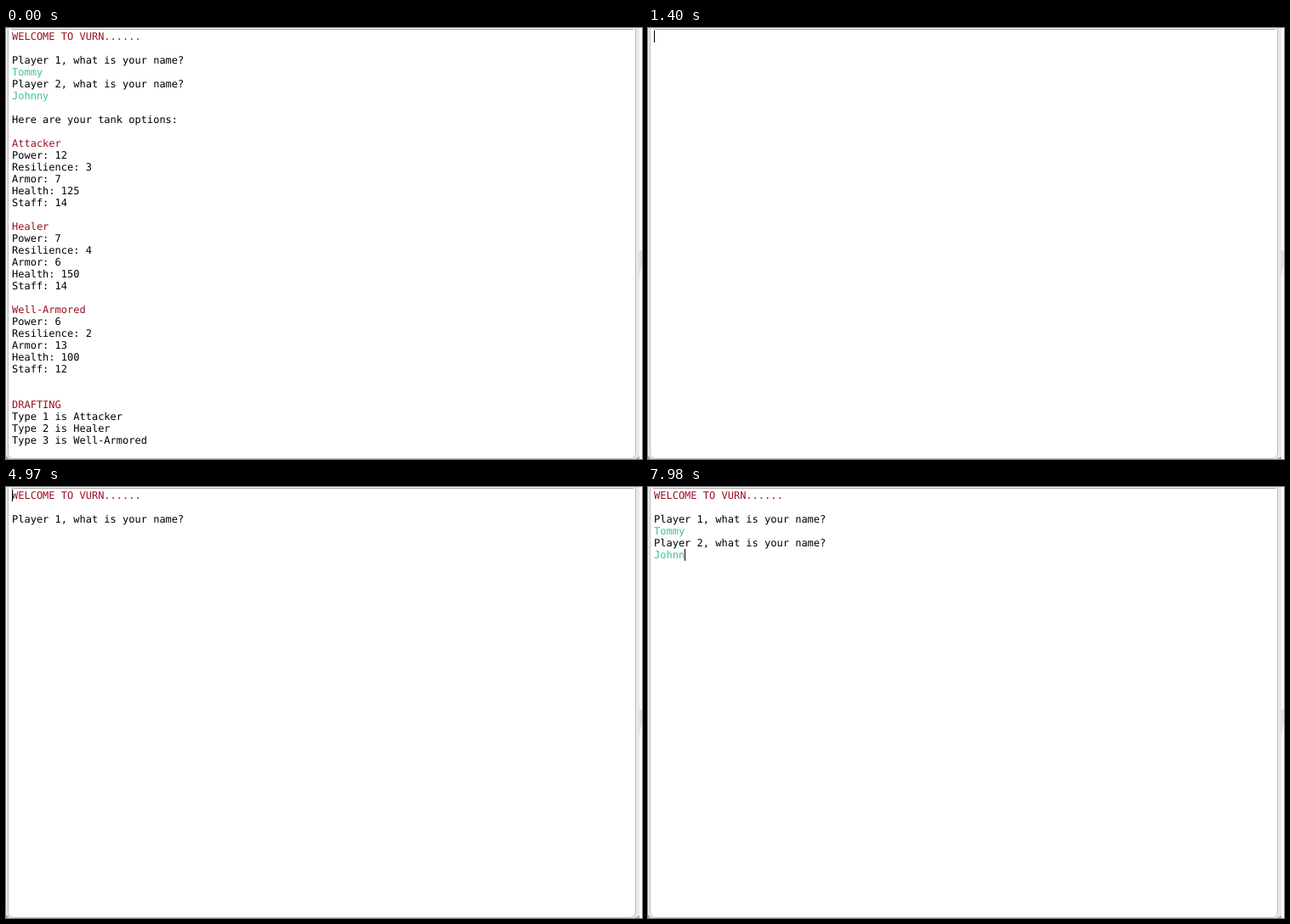
An HTML page for the animation above (8 s loop, 748 px wide and 508 px high).

```html
<!DOCTYPE html>
<html lang="en">
<head>
<meta charset="utf-8">
<title>Console game</title>
<style>
  html, body { margin: 0; width: 100%; height: 100%; overflow: hidden; background: #fff; }
  svg { display: block; width: 748px; height: 508px; }
  text {
    font: 12px "DejaVu Sans Mono", monospace;
    white-space: pre;
    text-rendering: geometricPrecision;
  }
</style>
</head>
<body>
<svg viewBox="0 0 748 508" xmlns="http://www.w3.org/2000/svg">
  <rect width="748" height="508" fill="#e9e9e9"/>
  <rect x="745" width="3" height="508" fill="#fafafa"/>
  <path d="M744 263Q746 261 748 263V279Q746 284 745 293H744Z" fill="#e2e2e2"/>
  <path d="M0 504V508H4ZM739 508H745V505Z" fill="#a8a8a8"/>
  <path d="M2.5 0V500Q2.5 507.5 10 507.5H733Q740.5 507.5 740.5 500V0Z" fill="#fff" stroke="#bdbdbd"/>
  <rect x="3" width="737" height="1" fill="#fff"/>
  <rect x="6" y="1" width="732" height="1" fill="#a3a3a3"/>
  <g id="screen"></g>
  <rect id="caret" width="1" height="14" fill="#000"/>
</svg>
<script>
const NS = 'http://www.w3.org/2000/svg';
const RED = '#9c0f22', GREEN = '#3dc48d', BLACK = '#000';
const LOOP = 8000, LEFT = 7, ROW = 14, ADVANCE = 7.224, BLINK = 560;
const screenEl = document.getElementById('screen');
const caretEl = document.getElementById('caret');

// A line is a list of [text, colour] runs.
const red = s => [[s, RED]];
const green = s => [[s, GREEN]];
const black = s => [[s, BLACK]];
const blank = [];

const TITLE = 'WELCOME TO VURN';
const ask = n => black(`Player ${n}, what is your name?`);
const attackAsk = name => black(`${name}, would you like to attack? Yes or No`);

function tank(type, power, resilience, armor, health, staff) {
  const stats = { Power: power, Resilience: resilience, Armor: armor, Health: health, Staff: staff };
  return [red(type), ...Object.entries(stats).map(([k, v]) => black(`${k}: ${v}`)), blank];
}

const draftLines = [
  red(TITLE + '......'), blank,
  ask(1), green('Tommy'), ask(2), green('Johnny'), blank,
  black('Here are your tank options:'), blank,
  ...tank('Attacker', 12, 3, 7, 125, 14),
  ...tank('Healer', 7, 4, 6, 150, 14),
  ...tank('Well-Armored', 6, 2, 13, 100, 12),
  blank,
  red('DRAFTING'),
  ...['Attacker', 'Healer', 'Well-Armored'].map((t, i) => black(`Type ${i + 1} is ${t}`))
];

const battleLines = [
  attackAsk('Tommy'), green('y'),
  black('Okay, all alive tanks get +2 staff and +10 health'),
  [['Tommy', RED], [', here are your tanks current attributes:', BLACK]], blank,
  red('Tank #1'), ...tank('Well-Armored', 6, 2, 13, 110, 14),
  red('Tank #2'), ...tank('Well-Armored', 6, 2, 13, 110, 14),
  red('Tank #3'), ...tank('Attacker', 12, 3, 7, 135, 16),
  black("There was no attack or the Defending Tank's health or staff is 0 or below. There will be no defense."),
  blank,
  [['ATTACKING', RED], ['......', BLACK]],
  red("It is Johnny's turn"), blank,
  attackAsk('Johnny')
];

// Characters typed so far, one per step from the start time.
const typed = (word, t, start, step) =>
  t < start ? '' : word.slice(0, Math.floor((t - start) / step) + 1);

const blinkOn = (t, start) => Math.floor((t - start) / BLINK) % 2 === 0;

function introState(t) {
  const lines = [];
  let caret = { row: 0, col: 0, on: blinkOn(t, 1120) };
  if (t >= 1680) {
    const dots = Math.max(0, Math.min(6, Math.floor((t - 1680) / 280)));
    lines.push(red(TITLE + '.'.repeat(dots)));
  }
  if (t >= 4340) lines.push(blank, ask(1));
  if (t >= 5390) {
    const word = t < 5460 ? 'T' : 'T' + typed('ommy', t, 5600, 140);
    lines.push(green(word));
    caret = { row: 3, col: word.length, on: true };
  }
  if (t >= 6300) {
    lines.push(ask(2));
    caret = { row: 5, col: 0, on: blinkOn(t, 6300) };
  }
  if (t >= 7420) {
    const word = typed('Johnny', t, 7420, 140);
    lines.push(green(word));
    caret = { row: 5, col: word.length, on: true };
  }
  return { lines, caret, shift: 0 };
}

function stateAt(t) {
  if (t < 1190) return { lines: draftLines, caret: { row: 6, col: 0, on: t >= 560 }, shift: 0 };
  if (t < 1400) return { lines: battleLines, caret: { row: 2, col: 0, on: true }, shift: -1 };
  return introState(t);
}

function lineEl(runs, row, shift) {
  const el = document.createElementNS(NS, 'text');
  el.setAttribute('x', LEFT);
  el.setAttribute('y', 14 + row * ROW + shift);
  for (const [text, fill] of runs) {
    const span = document.createElementNS(NS, 'tspan');
    span.setAttribute('fill', fill);
    span.textContent = text;
    el.append(span);
  }
  return el;
}

let shown = '';
function draw(t) {
  const { lines, caret, shift } = stateAt(t);
  const key = JSON.stringify(lines) + shift;
  if (key !== shown) {
    shown = key;
    screenEl.replaceChildren(...lines.map((runs, i) => lineEl(runs, i, shift)));
  }
  caretEl.setAttribute('x', Math.round(LEFT + caret.col * ADVANCE));
  caretEl.setAttribute('y', 3 + caret.row * ROW + shift);
  caretEl.setAttribute('visibility', caret.on ? 'visible' : 'hidden');
}

let start;
function tick(now) {
  start ??= now;
  draw((now - start) % LOOP);
  requestAnimationFrame(tick);
}
draw(0);
requestAnimationFrame(tick);
</script>
</body>
</html>
```
